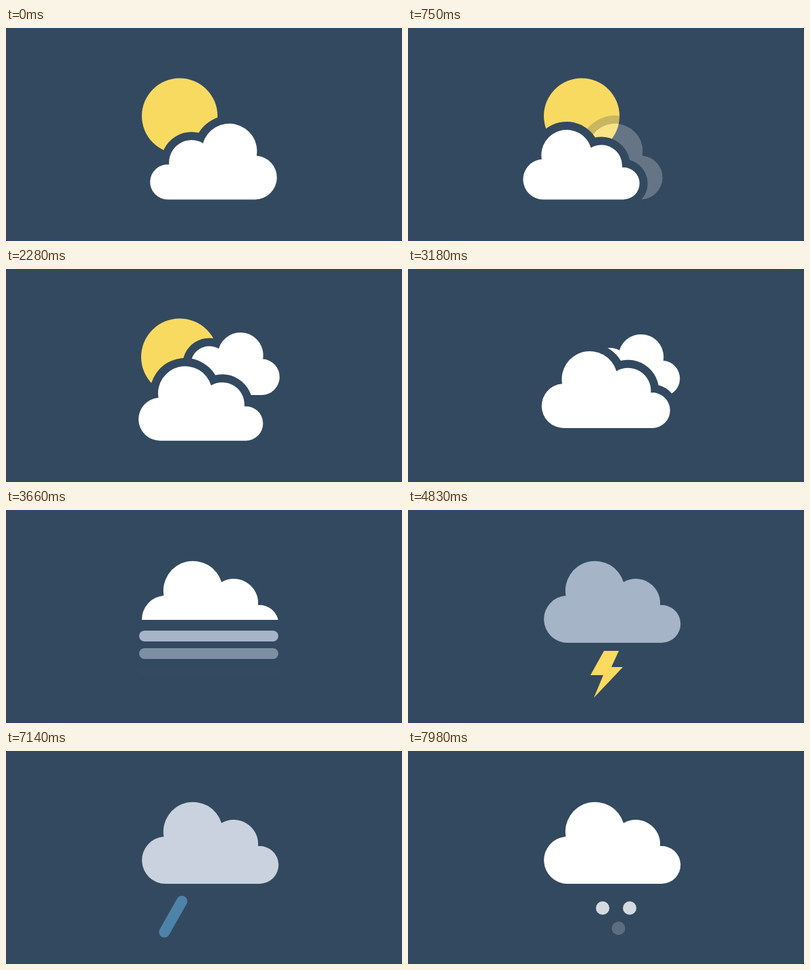
Animation, 586 px wide and 316 px high, one loop 8 s. Source, as an HTML page:

```html
<!DOCTYPE html>
<html lang="en">
<head>
<meta charset="utf-8">
<title>Weather</title>
<style>
  html, body { margin: 0; width: 100%; height: 100%; overflow: hidden; background: #33495f; }
  svg { display: block; width: 100vw; height: 100vh; }
  .cloud { fill: #fff; stroke: #33495f; stroke-width: 24; paint-order: stroke; vector-effect: non-scaling-stroke; }
  .drop { stroke-width: 16; stroke-linecap: round; }
</style>
</head>
<body>
<svg viewBox="0 0 586 316">
  <defs>
    <clipPath id="cut"><rect id="cutBox" x="100" width="420"/></clipPath>
    <clipPath id="below"><rect y="209" width="586" height="107"/></clipPath>
  </defs>
  <rect width="586" height="316" fill="#33495f"/>
  <circle id="sun" cx="257" cy="130.5" fill="#f9da61"/>
  <path id="back" class="cloud"/>
  <path id="old" class="cloud"/>
  <g id="bars" fill="#a6b5c7">
    <rect x="197" y="179" width="206" height="16" rx="8"/>
    <rect x="197" y="205" width="206" height="16" rx="8"/>
    <rect x="197" y="231" width="206" height="16" rx="8"/>
  </g>
  <path id="front" class="cloud" clip-path="url(#cut)"/>
  <g clip-path="url(#below)">
    <path id="bolt" fill="#fbda60" d="M290 209H312L301 233H318L275 278.5L289 245H270Z"/>
    <path id="white" class="drop" stroke="#fff" d="M338 219L312 264.5"/>
    <path id="blue" class="drop" stroke="#61abdb" d="M263 218L237 264"/>
  </g>
  <g id="snow" fill="#fff">
    <circle cx="288" cy="233" r="10"/>
    <circle cx="328" cy="233" r="10"/>
    <circle cx="311.5" cy="263" r="10"/>
  </g>
  <rect y="315" width="586" height="1" fill="#354463"/>
</svg>
<script>
const LOOP = 8000;
const SLANT = -0.565;
const CLOUD = 'M236 197A35 35 0 0 1 233.5 127.1A44 44 0 0 1 319 107A36 36 0 0 1 373 141.1A28 28 0 1 1 375 197Z';

const $ = id => document.getElementById(id);
const [sun, back, old, front, bolt, white, blue, cutBox] =
  ['sun', 'back', 'old', 'front', 'bolt', 'white', 'blue', 'cutBox'].map($);
const bars = [...$('bars').children];
const flakes = [...$('snow').children];
[back, old, front].forEach(c => c.setAttribute('d', CLOUD));

// Progress of time t through a span, 0 to 1
const span = (t, from, to) => Math.min(1, Math.max(0, (t - from) / (to - from)));
const lerp = (a, b, p) => a + (b - a) * p;
const backIn = (p, s) => p * p * ((s + 1) * p - s);
const backOut = (p, s) => 1 - backIn(1 - p, s);
const smooth = p => p * p * (3 - 2 * p);
const cubicOut = p => 1 - (1 - p) ** 3;

function fade(el, a) {
  el.setAttribute('opacity', a);
  el.style.display = a > 0 ? '' : 'none';
}

// x is the left edge, or the right edge of a mirrored cloud; y is the base
function place(el, x, y, k, mirrored) {
  el.setAttribute('transform',
    `translate(${x} ${y}) scale(${mirrored ? -k : k} ${k}) translate(-201 -197)`);
}

function slide(el, dy) {
  el.setAttribute('transform', `translate(${SLANT * dy} ${dy})`);
}

function drawSun(t) {
  const k = 1 - backIn(span(t, 2225, 2850), 2.6);
  sun.setAttribute('r', Math.max(0, 56 * k));
}

function drawClouds(t) {
  fade(old, 1 - span(t, 630, 790));
  place(old, 401 - 0.2 * Math.max(0, t - 630), 254.4, 0.928, true);

  const p = span(t, 693, 1230);
  const e = backOut(p, 1.7);
  let k = lerp(0.79, 0.93, e) + 0.09 * Math.sin(Math.PI * p) ** 4;
  let x = lerp(217, 307, e) - 101 * k;
  let y = 254.4;

  const aside = smooth(span(t, 1500, 1830));
  x = lerp(x, 196, aside);
  k = lerp(k, 0.911, aside);
  y = lerp(y, 254.7, aside);

  const lift = backOut(span(t, 3150, 3600), 2.2);
  x = lerp(x, 201, lift);
  k = lerp(k, 1, lift);
  y = lerp(y, 197, lift);
  place(front, x, y, k);
  fade(front, span(t, 655, 710));

  const cut = smooth(span(t, 3300, 3500)) - smooth(span(t, 4380, 4560));
  cutBox.setAttribute('height', cut > 0 ? 197 - 34 * cut : 316);

  const grey = span(t, 4380, 4620) - span(t, 6630, 7900);
  front.style.fill = `rgb(${lerp(255, 165, grey)},${lerp(255, 180, grey)},${lerp(255, 199, grey)})`;

  const enter = cubicOut(span(t, 1500, 1830));
  const leave = smooth(span(t, 3150, 3420));
  const away = 1 - enter + leave;
  place(back, 405 - 70 * away, 187 + 55 * away, 0.765 - 0.15 * away, true);
  fade(back, t < 1500 ? 0 : 1 - span(t, 3270, 3420));
}

function drawFog(t) {
  bars.forEach((bar, i) => {
    const start = 3390 + 135 * i;
    fade(bar, span(t, start, start + 210) * (1 - span(t, 4380, 4560)));
  });
}

function drawBolt(t) {
  const enter = backOut(span(t, 4440, 4830), 2.2);
  const leave = span(t, 5130, 5600) ** 2;
  slide(bolt, -80 * (1 - enter) + 115 * leave);
  fade(bolt, t > 4440 && t < 5600 ? 1 : 0);
}

function drawDrop(el, t, start, end) {
  const enter = backOut(span(t, start, start + 450), 3);
  const leave = span(t, end, end + 450);
  slide(el, -86 * (1 - enter) + 29 * leave * leave);
  fade(el, t > start ? 1 - leave : 0);
}

function drawSnow(t) {
  flakes.forEach((flake, i) => fade(flake, span(t - (i === 2 ? 405 : 0), 7440, 8115)));
}

function draw(t) {
  drawSun(t);
  drawClouds(t);
  drawFog(t);
  drawBolt(t);
  drawDrop(white, t, 5700, 6630);
  drawDrop(blue, t, 5820, 6960);
  drawSnow(t);
}

function tick() {
  draw(performance.now() % LOOP);
  requestAnimationFrame(tick);
}
tick();
</script>
</body>
</html>
```
